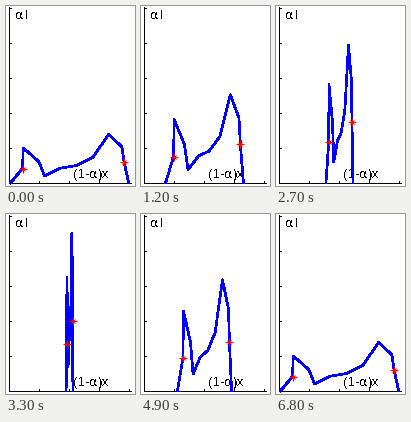
Recreate the animation shown at these times as a matplotlib script. Size 129 by 180 pixels, loop 6.9 s.

```python
import numpy as np
import matplotlib.pyplot as plt
from matplotlib.animation import FuncAnimation

W, H, DPI = 129, 180, 100
STEPS = 34                      # steps from widest to narrowest
FRAMES = 2 * STEPS + 1
LEFT, CENTER, BASE = 3.5, 63.5, 177.5
PT = 72 / DPI                   # points per pixel

plt.rcParams["text.antialiased"] = False


def profile():
    """Outline at alpha = 0.3: offset from the centre, height above the axis."""
    rise = [(-59.5, 0), (-47, 15), (-46.2, 35.6), (-30.7, 21.8)]
    t = np.linspace(0, 1, 5)
    valley = np.column_stack([-25 + 64.3 * t,
                              np.polyval([107.7, -119.8, 53.7, 7.7], t)])
    fall = [(52.5, 36.4), (54.5, 22), (59.3, 0)]
    return np.vstack([rise, valley, fall])


PROFILE = profile()
STARS = PROFILE[[1, -2]]

fig = plt.figure(figsize=(W / DPI, H / DPI), dpi=DPI, facecolor="white")
ax = fig.add_axes([0, 0, 1, 1])
ax.set(xlim=(0, W), ylim=(H, 0))
ax.axis("off")


def stroke(xs, ys, **kw):
    style = dict(color="black", lw=PT, antialiased=False, snap=False)
    return ax.plot(xs, ys, **{**style, **kw})[0]


def label(x, y, s):
    ax.text(x, y, s, family="Liberation Sans", size=13.33 * PT, va="baseline")


def alpha_sign(x, y):
    ax.text(x, y, "α", family="DejaVu Sans", size=12.5 * PT, va="baseline")


def star_layer(marker, size):
    return stroke([], [], color="red", ls="none", marker=marker,
                  ms=size * PT, mew=PT, zorder=4, snap=None)


# Axes with inward ticks
stroke([LEFT, LEFT], [2, BASE])
stroke([LEFT, 125], [BASE, BASE])
for x in LEFT + 30 * np.arange(1, 5):
    stroke([x, x], [BASE - 2, BASE])
for y in BASE - 35 * np.arange(1, 6):
    stroke([LEFT, LEFT + 2], [y, y])

alpha_sign(9.5, 13)
label(19, 13, "l")
label(67.5, 172, "(1-")
alpha_sign(83, 172)
label(92, 172, ")x")

curve = stroke([], [], color="blue", lw=1.7 * PT, zorder=3,
               solid_joinstyle="round", solid_capstyle="butt")
stars = [star_layer("+", 8), star_layer("x", 5)]


def place(points, alpha):
    x = CENTER + points[:, 0] * (1 - alpha) / 0.7
    y = BASE - points[:, 1] * alpha / 0.3
    return x, y


def update(i):
    alpha = 0.3 + 0.02 * (STEPS - abs(i - STEPS))
    curve.set_data(*place(PROFILE, alpha))
    for layer in stars:
        layer.set_data(*place(STARS, alpha))
    return curve, *stars


anim = FuncAnimation(fig, update, frames=FRAMES, interval=100,
                     init_func=lambda: update(0), repeat=True, repeat_delay=0)
plt.show()
```
